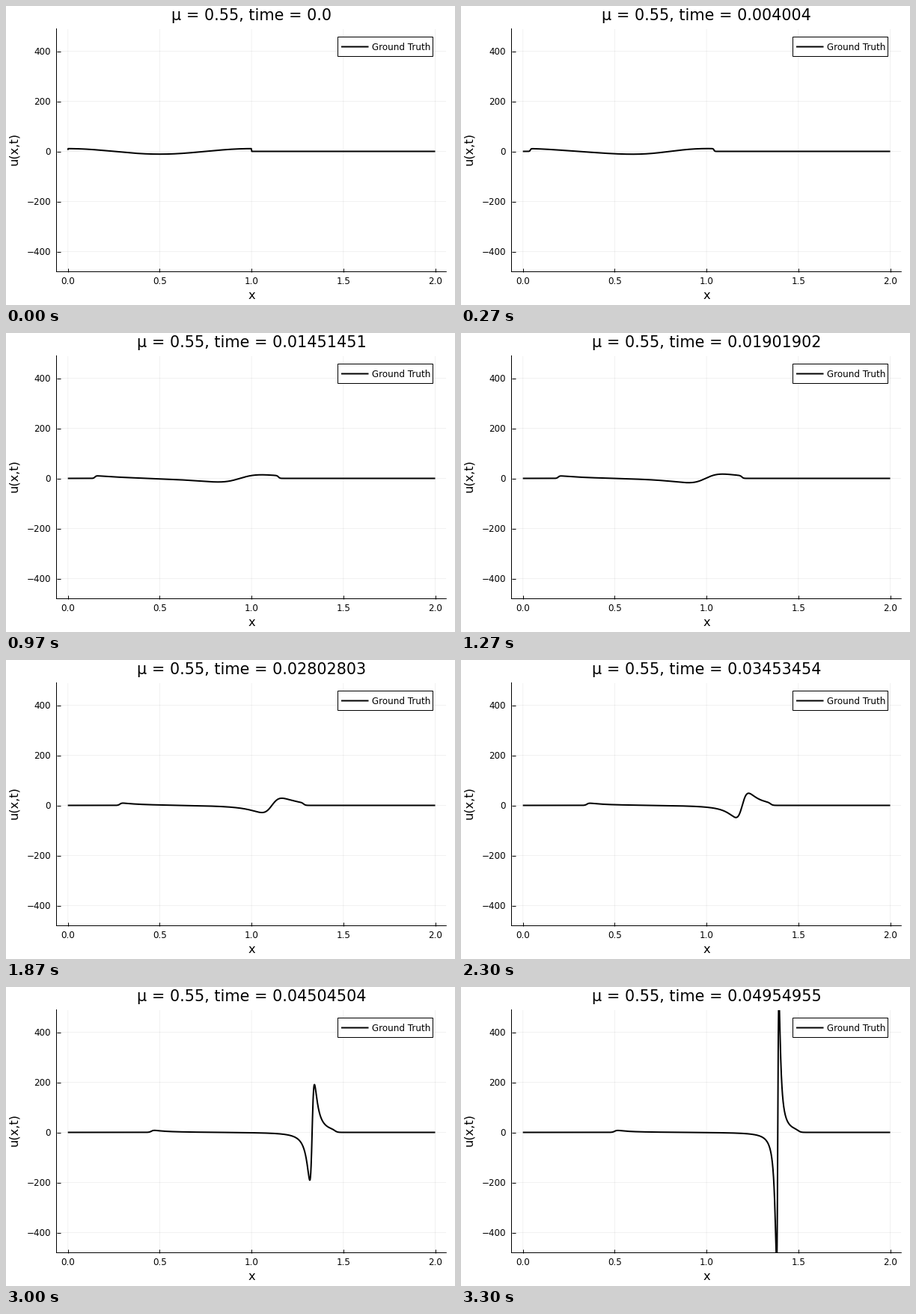
Write a matplotlib script that moves like this. It is 600x400 px and loops after 3330 ms.

```python
import matplotlib.pyplot as plt
import numpy as np
from matplotlib.animation import FuncAnimation
from matplotlib.lines import Line2D
from matplotlib.patches import Rectangle

W, H, DPI = 600, 400, 100
FRAMES, LOOP = 100, 3330
PT = 72 / DPI

# Stage pixels of the plot area and its scales
LEFT, RIGHT, TOP, BOTTOM = 67.5, 588.3, 30.5, 355.5
X_ZERO, Y_ZERO = 82.7, 194.5
X_SCALE, Y_SCALE = 245.4, 0.335

# Wave: steepening profile carried along characteristics
AMP, SPEED, BREAK_TIME = 11, 10.13, 0.058

SMALL, MEDIUM, LARGE = 11.9, 16.3, 20.8

plt.rcParams["font.family"] = "DejaVu Sans"
plt.rcParams["path.snap"] = False
fig = plt.figure(figsize=(W / DPI, H / DPI), dpi=DPI, facecolor="white")


def text(x, y, s, size, ha="center", **kw):
    return fig.text(x / W, 1 - y / H, s, fontsize=size * PT, ha=ha,
                    va="baseline", color="black", **kw)


def to_x(x):
    return X_ZERO + x * X_SCALE


def to_y(u):
    return Y_ZERO - u * Y_SCALE


ax = fig.add_axes([LEFT / W, 1 - BOTTOM / H, (RIGHT - LEFT) / W, (BOTTOM - TOP) / H])
ax.set_xlim((LEFT - X_ZERO) / X_SCALE, (RIGHT - X_ZERO) / X_SCALE)
ax.set_ylim((Y_ZERO - BOTTOM) / Y_SCALE, (Y_ZERO - TOP) / Y_SCALE)
ax.set_xticks([0, 0.5, 1, 1.5, 2])
ax.set_yticks([-400, -200, 0, 200, 400])
ax.set_axisbelow(True)
ax.grid(color="black", alpha=0.055, linewidth=PT)
ax.tick_params(direction="in", length=5 * PT, width=PT,
               labelbottom=False, labelleft=False)
ax.spines[["top", "right"]].set_visible(False)
ax.spines[["left", "bottom"]].set_linewidth(PT)

for v in ax.get_xticks():
    text(to_x(v), 371.6, f"{v:.1f}", SMALL)
for v in ax.get_yticks():
    text(60, to_y(v) + 4.4, f"{v:.0f}".replace("-", "\u2212"), SMALL, ha="right")
text(328, 391.5, "x", MEDIUM)
text(15.3, 213.4, "u(x,t)", MEDIUM, ha="left", rotation=90,
     rotation_mode="anchor")
title = text(328, 19.4, "", LARGE)

stroke = dict(color="black", linewidth=2 * PT, solid_capstyle="butt",
              solid_joinstyle="round")
curve, = ax.plot([], [], **stroke)

# Legend
fig.add_artist(Rectangle((443.5 / W, 1 - 67.5 / H), 127 / W, 26 / H,
                         facecolor="white", edgecolor="black",
                         linewidth=PT, zorder=5))
fig.add_artist(Line2D([448 / W, 484.5 / W], [1 - 54.5 / H] * 2, zorder=6, **stroke))
text(489.1, 59, "Ground Truth", SMALL, ha="left", zorder=6)


def step(z):
    return 0.5 * (1 + np.tanh(0.8 * z))


def wave(t):
    start = np.linspace(0, 2, 2001) - SPEED * t
    phase = 2 * np.pi * np.clip(start, 0, 1)
    tau = t / BREAK_TIME
    x = start + SPEED * t + tau * (1 - np.cos(phase)) / (2 * np.pi)
    blur = 0.0005 + 0.0475 * np.sqrt(t)
    window = step(start / blur) * step((1 - start) / blur)
    u = AMP * window * np.cos(phase) / (1 + tau * np.sin(phase)) ** 3
    return x, u


def update(i):
    # Single precision decides the last digit of the clock
    t = float(np.float32(i * 10 * 0.05 / 999))
    curve.set_data(*wave(t))
    title.set_text(f"μ = 0.55, time = {round(t, 8)}")
    return curve, title


anim = FuncAnimation(fig, update, frames=FRAMES, interval=LOOP / FRAMES,
                     repeat=True, repeat_delay=0, blit=False)
plt.show()
```
